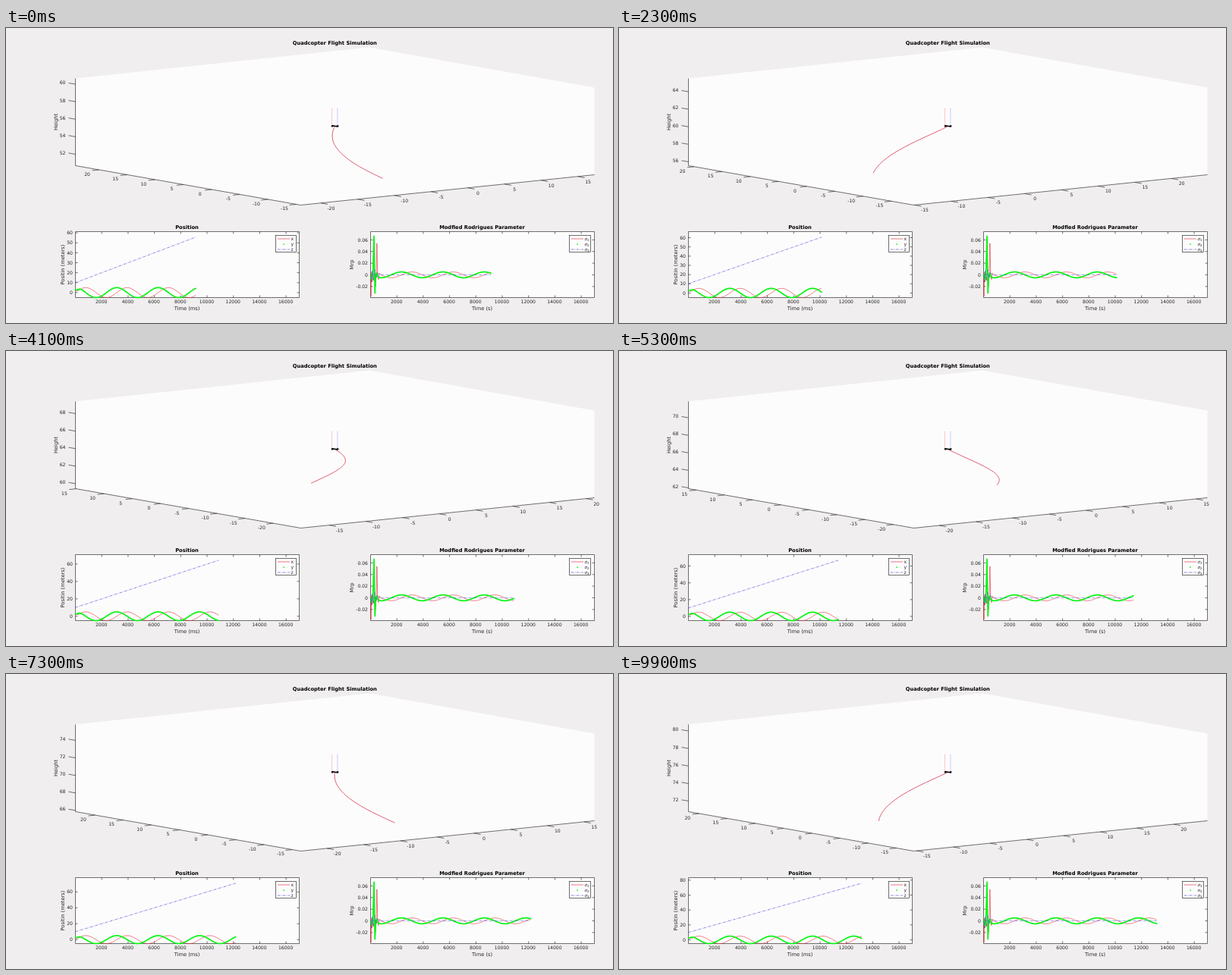
Recreate the animation shown at these times as an HTML page. Size 800 by 389 pixels, loop 10 s.

```html
<!DOCTYPE html>
<html>
<head>
<meta charset="utf-8">
<style>
html, body { margin: 0; width: 100%; height: 100%; overflow: hidden; background: #f0eeee; }
svg { display: block; width: 800px; height: 389px; }
text { font: 6.1px "DejaVu Sans", sans-serif; fill: #262626; }
.label { font-size: 6.7px; }
.title { font-size: 6.7px; font-weight: bold; fill: #000; }
.greek { font: italic 5.6px "DejaVu Sans", sans-serif; }
/* centre strokes on pixels */
path, rect { transform: translate(.5px, .5px); }
path { fill: none; }
.face { fill: #fdfcfd; }
.axis { stroke: #262626; stroke-width: .65; }
.red { stroke: #dc2f3c; stroke-width: .65; }
.green { stroke: #0cf516; stroke-width: 1.75; stroke-linecap: round; stroke-linejoin: round; }
.blue { stroke: #4444d4; stroke-width: .65; stroke-dasharray: 3.4 1.3 .8 1.3; }
.trail { stroke: #d0283c; stroke-width: .75; }
.rotor { stroke-width: .8; stroke-dasharray: 1.5 .6; }
.frame { stroke: #000; stroke-width: 1.3; }
</style>
</head>
<body>
<svg viewBox="0 0 800 389">
  <g id="fixed"></g>
  <g id="moving"></g>
</svg>
<script>
const FRAME = 100, FRAMES = 100;
// Climb since the start of the loop: [frame, metres]
const CLIMB = [[0, 0], [13, 2.73], [23, 4.86], [41, 8.73], [64, 13.48], [83, 17.03], [99, 20.09]];
const START_HEIGHT = 55.68, CLIMB_RATE = 0.005, RADIUS = 5, TRAIL_MS = 1000;

// Plot geometry
const LEFT = 91, RIGHT = 480, WIDTH = 295, TOP = 268, BOTTOM = 355, PX_PER_MS = WIDTH / 17000;
// Screen vectors of one unit along each 3D axis
const A = [9.675, -1], B = [-7.425, -1.3], Z = 11.55;
const CENTER = [433, 129.2];

const range = (from, to, step) => {
  const list = [];
  for (let v = Math.ceil(from / step) * step; v <= to + 1e-9; v += step) list.push(v);
  return list;
};
const fix = n => n.toFixed(2);
const path = (cls, points) =>
  `<path class="${cls}" d="M${points.map(p => p.map(fix).join(' ')).join('L')}"/>`;
const text = (x, y, str, cls = '', anchor = 'middle', extra = '') =>
  `<text x="${fix(x)}" y="${fix(y)}" class="${cls}" text-anchor="${anchor}" ${extra}>${str}</text>`;
const upright = (x, y, str) => text(x, y, str, 'label', 'middle', `transform="rotate(-90 ${x} ${y})"`);

function interpolate(points, at) {
  let i = 1;
  while (i < points.length - 1 && points[i][0] < at) i++;
  const [x0, y0] = points[i - 1], [x1, y1] = points[i];
  return y0 + (y1 - y0) * (at - x0) / (x1 - x0);
}

// Flight path: the quadcopter settles into a rising circle
function settle(from, target, ms) {
  const k = Math.min(1, ms / 500);
  return from + (target - from) * k * k * (3 - 2 * k);
}
const posX = ms => settle(2, RADIUS * Math.sin(ms / 500), ms);
const posY = ms => settle(2.5, RADIUS * Math.cos(ms / 500), ms);
const posZ = ms => 10 + CLIMB_RATE * ms;

// Attitude: a short transient, then a small steady oscillation
const KICK = {
  s1: [[0, 0], [30, -.037], [70, .004], [110, -.012], [160, .006], [220, -.01], [290, .004],
       [370, -.02], [430, 0], [480, .054], [540, -.003], [600, -.008], [670, .003], [800, 0]],
  s2: [[0, 0], [100, -.008], [180, .004], [260, .0665], [330, -.0315], [390, -.002], [450, .003], [600, -.0045], [800, -.005]],
  s3: [[0, 0], [60, -.012], [120, .007], [200, -.008], [300, .009], [420, -.006], [520, .004], [640, 0]]
};
const steady = {
  s1: ms => .005 * Math.cos(ms / 500),
  s2: ms => -.005 * Math.sin(ms / 500),
  s3: () => 0
};
const attitude = (key, end) =>
  KICK[key].concat(range(820, end, 20).concat(end).map(ms => [ms, steady[key](ms)]));

function frame2d(x0, yTicks, yOf, yText) {
  const x1 = x0 + WIDTH;
  let out = path('axis', [[x0, TOP], [x1, TOP], [x1, BOTTOM], [x0, BOTTOM], [x0, TOP]]);
  for (const ms of range(2000, 16000, 2000)) {
    const x = x0 + ms * PX_PER_MS;
    out += path('axis', [[x, BOTTOM], [x, BOTTOM - 3]]) + path('axis', [[x, TOP], [x, TOP + 3]]);
  }
  for (const v of yTicks) {
    const y = yOf(v);
    out += path('axis', [[x0, y], [x0 + 3, y]]) + path('axis', [[x1, y], [x1 - 3, y]])
      + text(x0 - 3, y + 2.6, yText(v), '', 'end');
  }
  return out;
}

function legend(x, width, names, cls) {
  const lineX = x + 2.5;
  return `<rect x="${x}" y="273" width="${width}" height="22" class="face axis"/>`
    + path('red', [[lineX, 277.5], [lineX + 16, 277.5]])
    + path('green', [[lineX + 8, 284.5], [lineX + 8.1, 284.5]])
    + path('blue', [[lineX, 291.5], [lineX + 16, 291.5]])
    + names.map((name, i) => text(lineX + 18, 280 + 7 * i, name, cls, 'start')).join('');
}

function panel(x0, title, xLabel) {
  const mid = x0 + WIDTH / 2;
  return `<rect x="${x0}" y="${TOP}" width="${WIDTH}" height="${BOTTOM - TOP}" class="face"/>`
    + text(mid, 264.8, title, 'title') + text(mid, 372.3, xLabel, 'label')
    + range(2000, 16000, 2000).map(ms => text(x0 + ms * PX_PER_MS, 363.3, ms)).join('');
}

const mrpY = v => 325 - v * 768;

function drawFixed() {
  return '<path style="fill:#fdfcfd" d="M91 66L478 25L775 78V193L388 233L91 181Z"/>'
    + path('axis', [[91, 66], [91, 181], [388, 233], [775, 193]])
    + text(433.3, 21.7, 'Quadcopter Flight Simulation', 'title')
    + upright(67.5, 124, 'Height')
    + panel(LEFT, 'Position', 'Time (ms)') + upright(77, 312, 'Positin (meters)')
    + panel(RIGHT, 'Modfied Rodrigues Parameter', 'Time (s)') + upright(458, 312, 'Mrp')
    + frame2d(RIGHT, [-.02, 0, .02, .04, .06], mrpY, v => v ? v.toFixed(2) : '0');
}

function drawScene(now) {
  const a = posX(now), b = posY(now), z = posZ(now);
  let out = '';
  for (const v of range(z - 5, z + 5, 2)) {
    const y = 123.5 - Z * (v - z);
    out += path('axis', [[91, y], [82, y - 1.6]]) + text(78.5, y + .8, v, '', 'end');
  }
  for (const v of range(b - 20, b + 20, 5)) {
    const x = 239.5 + B[0] * (v - b), y = 207 + B[1] * (v - b);
    out += path('axis', [[x, y], [x - 9, y + .95]]) + text(x - 15, y + 8.4, v);
  }
  for (const v of range(a - 20, a + 20, 5)) {
    const x = 581.5 + A[0] * (v - a), y = 213 + A[1] * (v - a);
    out += path('axis', [[x, y], [x + 9, y + 1.6]]) + text(x + 14, y + 9.4, v);
  }
  const trail = range(0, TRAIL_MS, 20).map(ago => {
    const ms = now - ago, da = posX(ms) - a, db = posY(ms) - b;
    return [
      CENTER[0] + A[0] * da + B[0] * db,
      CENTER[1] + A[1] * da + B[1] * db + Z * CLIMB_RATE * ago
    ];
  });
  return out + path('trail', trail)
    + '<path class="rotor" d="M429 128V105.5" stroke="#f2a0a4"/>'
    + '<path class="rotor" d="M436.4 128V105.5" stroke="#a6a6f4"/>'
    + '<path class="frame" d="M428.5 128.8H437.5M429.5 128.2L436.5 129.5"/>'
    + '<path class="frame" d="M428.4 128.3h2M428.4 129.3h2M435.8 128.3h2M435.8 129.3h2"/>';
}

function drawPosition(now) {
  const max = posZ(now) * 1.1;
  const yOf = v => BOTTOM - (v + 5) * (BOTTOM - TOP) / (max + 5);
  const times = range(0, now, 40).concat(now);
  const curve = (cls, f) => path(cls, times.map(ms => [LEFT + ms * PX_PER_MS, yOf(f(ms))]));
  return frame2d(LEFT, range(0, max, max < 70 ? 10 : 20), yOf, String)
    + curve('red', posX) + curve('green', posY)
    + path('blue', [0, now].map(ms => [LEFT + ms * PX_PER_MS, yOf(posZ(ms))]))
    + legend(355, 27, ['x', 'y', 'z'], '');
}

function drawAttitude(now) {
  const curve = (cls, key) =>
    path(cls, attitude(key, now).map(([ms, v]) => [RIGHT + ms * PX_PER_MS, mrpY(v)]));
  const names = [1, 2, 3].map(i => `σ<tspan dy="1" font-size="4">${i}</tspan>`);
  return curve('red', 's1') + curve('green', 's2') + curve('blue', 's3')
    + legend(742, 28, names, 'greek');
}

function draw(t) {
  const n = Math.floor(t / FRAME) % FRAMES;
  const now = (START_HEIGHT + interpolate(CLIMB, n) - 10) / CLIMB_RATE;
  document.getElementById('moving').innerHTML = drawScene(now) + drawPosition(now) + drawAttitude(now);
}

document.getElementById('fixed').innerHTML = drawFixed();
const start = performance.now();
function tick() {
  draw(performance.now() - start);
  requestAnimationFrame(tick);
}
tick();
</script>
</body>
</html>
```
